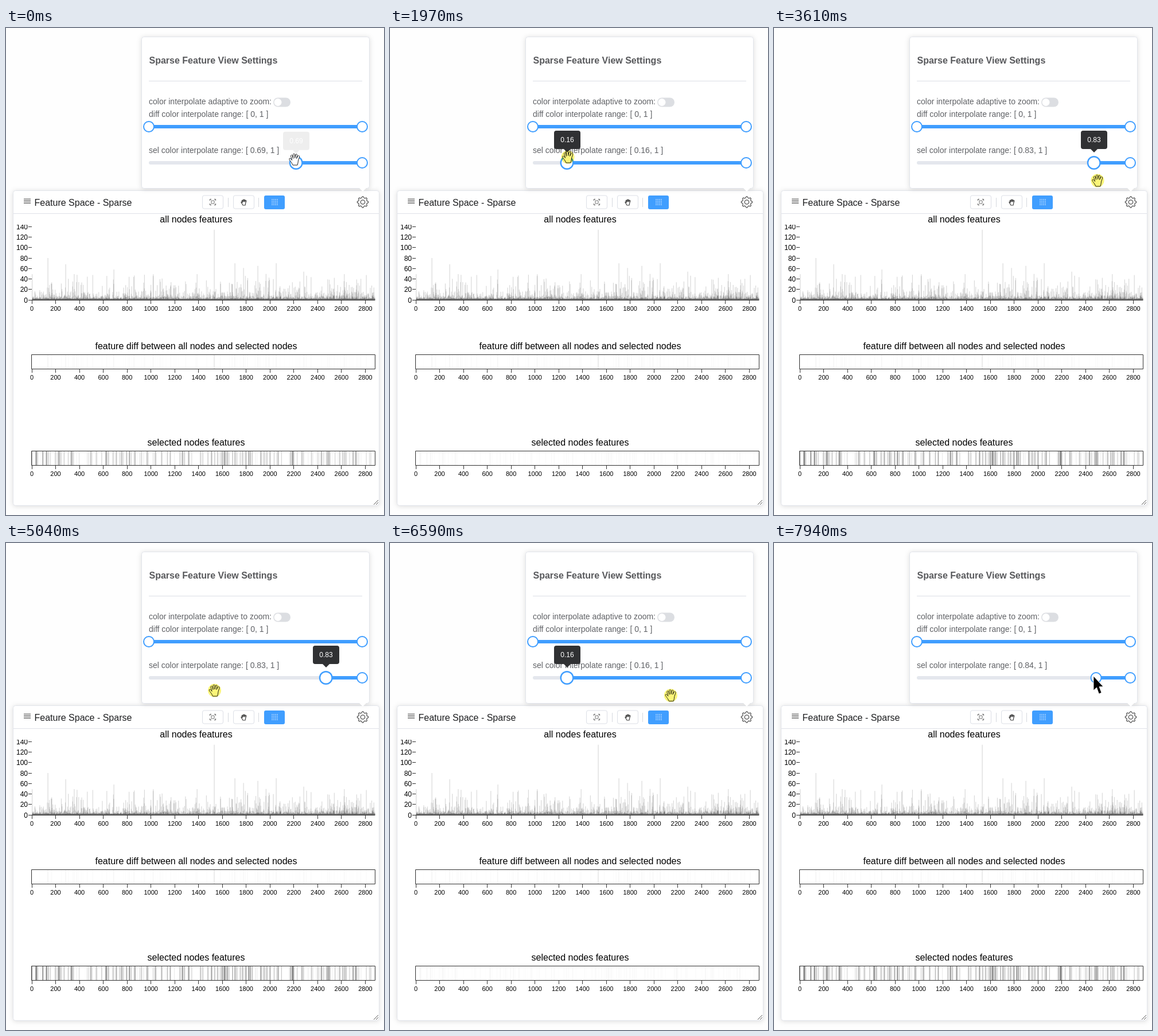
An HTML page with a canvas for the animation above (8010 ms loop, 659 px wide and 849 px high).

```html
<!DOCTYPE html>
<html lang="en">
<head>
<meta charset="utf-8">
<title>Sparse Feature View</title>
<style>
  html, body { margin: 0; width: 100%; height: 100%; overflow: hidden; background: #fefefe; }
  canvas, svg { position: absolute; left: 0; top: 0; width: 659px; height: 849px; }
  svg { font-family: "Liberation Sans", Arial, sans-serif; }
  .card { fill: #fff; stroke: #e2e5eb; filter: drop-shadow(0 1px 4px #0002); }
  .label { font-size: 14px; fill: #606266; }
  .title { font-size: 16px; fill: #000; text-anchor: middle; }
  .tick { font-size: 11px; fill: #000; text-anchor: middle; }
  .yTick { font-size: 12px; fill: #000; text-anchor: end; }
  .button { fill: #fff; stroke: #dcdfe6; }
  .line { fill: none; stroke: #555; }
  .knob { fill: #fff; stroke: #409eff; stroke-width: 2; }
</style>
</head>
<body>
<svg viewBox="0 0 659 849">
  <rect class="card" x="12.5" y="283.5" width="638" height="549" rx="4"/>
  <path d="M13 323.5H650" stroke="#dfe2e8"/>
  <path class="line" d="M31 298H43M31 300.5H43M31 303H43M31 305.5H43" stroke-width="1.2"/>
  <text x="49.5" y="309.5" font-size="16" fill="#1c1d1f">Feature Space - Sparse</text>
  <rect class="button" x="342.5" y="292" width="36" height="23" rx="3"/>
  <rect class="button" x="396.5" y="292" width="36" height="23" rx="3"/>
  <rect x="450" y="292" width="36" height="24" rx="3" fill="#409eff"/>
  <path d="M387.5 296V312M440.5 296V312" stroke="#d5d8de"/>
  <path class="line" d="M355.5 301v-2.5h2.5M363 298.5h2.5v2.5M365.5 306v2.5h-2.5M358 308.5h-2.5v-2.5"/>
  <rect class="line" x="358" y="301" width="5" height="5" stroke-width=".8"/>
  <path d="M463 299H474M463 302H474M463 305H474M463 308H474" stroke="#fff" stroke-width="1.2" stroke-dasharray="2 1" opacity=".8"/>
  <path id="handIcon" fill="#fff" stroke="#444" stroke-width="2.4" transform="translate(414.5 304) scale(.5)"/>
  <path id="gear" class="line" stroke-width="1.3" stroke-linejoin="round" transform="translate(622 303.5)"/>
  <circle class="line" cx="622" cy="303.5" r="3.7" stroke-width="1.3"/>
  <path class="line" d="M641 831L649 823M645 831L649 827"/>
  <g id="axes"></g>

  <rect class="card" x="236.5" y="15.5" width="397" height="264" rx="4"/>
  <path d="M616 279L622 285L628 279Z" fill="#fff"/>
  <text x="249.5" y="62" font-size="16" font-weight="bold" fill="#58595c">Sparse Feature View Settings</text>
  <path d="M249 92.5H621" stroke="#dcdfe6"/>
  <text class="label" x="249" y="133">color interpolate adaptive to zoom:</text>
  <rect x="466" y="121.5" width="30" height="16" rx="8" fill="#dcdee2"/>
  <circle cx="474" cy="129.5" r="6.5" fill="#fff"/>
  <text class="label" x="249" y="155">diff color interpolate range: [ 0, 1 ]</text>
  <rect x="249" y="169" width="372" height="6" fill="#409eff"/>
  <circle class="knob" cx="249" cy="172" r="9"/>
  <circle class="knob" cx="621" cy="172" r="9"/>
  <text class="label" id="rangeText" x="249" y="218"></text>
  <rect x="249" y="232" width="372" height="6" rx="3" fill="#e4e7ed"/>
  <rect id="bar" y="232" height="6" fill="#409eff"/>
  <circle class="knob" cx="621" cy="235" r="9"/>
  <circle class="knob" id="handle" r="9"/>
  <g id="tooltip">
    <path d="M-6 211H6L0 217Z" fill="#303133"/>
    <rect x="-23" y="179" width="46" height="32" rx="4" fill="#303133"/>
    <text id="tipText" y="199" font-size="12" fill="#fff" text-anchor="middle"></text>
  </g>
  <path id="hand" fill="#fff" stroke="#222" stroke-linejoin="round"/>
  <circle id="press" r="11.5" fill="#fbf578" style="mix-blend-mode:multiply"/>
  <path id="arrow" d="M0 0V25L5.5 20L9.5 31L14 29L10 18.5H17Z" stroke="#fff" stroke-width=".8"/>
</svg>
<canvas id="data" width="659" height="849"></canvas>
<script>
const $ = id => document.getElementById(id);
const set = (id, attrs) => { for (const k in attrs) $(id).setAttribute(k, attrs[k]); };
const LOOP = 8010, COUNT = 2880, LEFT = 45, WIDTH = 598, BASE = 474, UNIT = 0.9125;
const SLIDER = 249, SLIDER_WIDTH = 372;

// The tallest features; all others follow a seeded long-tailed distribution.
const peaks = [[73, 80], [104, 68], [188, 58], [363, 134], [399, 70], [414, 61], [439, 65], [471, 70], [519, 54]];

// Each cursor move eases out to its goal; the slider catches up in jumps.
const moves = [
  { start: 70, end: 260, x: 511, y: 247 },
  { start: 670, end: 1140, x: 354, y: 230 },
  { start: 1360, end: 1970, x: 310, y: 225 },
  { start: 2370, end: 3130, x: 498, y: 257 },
  { start: 3200, end: 3610, x: 564, y: 266 },
  { start: 4690, end: 5310, x: 317, y: 255 },
  { start: 6250, end: 6990, x: 560, y: 270 },
  { start: 7530, end: 7930, x: 557, y: 232 },
];
const sliderSteps = [[0, .69], [1100, .58], [1640, .16], [2850, .55], [3400, .83], [5650, .16], [6850, .84]];

const ramp = (t, start, end) => Math.min(1, Math.max(0, (t - start) / (end - start)));
const easeOut = p => 1 - (1 - p) ** 2;

function cursorAt(t) {
  let x = 503, y = 229;
  for (const move of moves) {
    const p = easeOut(ramp(t, move.start, move.end));
    x += (move.x - x) * p;
    y += (move.y - y) * p;
  }
  return [x, y];
}

function randomizer(seed) {
  return () => (seed = (seed * 16807) % 2147483647) / 2147483647;
}

const ctx = $("data").getContext("2d");
function stripe(x, y, height, alpha, width = 1) {
  ctx.fillStyle = `rgba(0,0,0,${alpha})`;
  ctx.fillRect(x, y, width, height);
}

function drawFeatures() {
  const random = randomizer(71);
  const drawFeature = (x, value) => {
    stripe(x, BASE - value * UNIT, value * UNIT, .15, 1.2);
    stripe(x, 570, 24, .1 * (value / 100) ** 1.6);
  };
  for (let i = 0; i < COUNT; i++) drawFeature(LEFT + i * WIDTH / COUNT, 1.5 / (random() + .03));
  for (const [x, value] of peaks) drawFeature(x - .5, value);
}

function drawSelected(value) {
  const random = randomizer(53);
  ctx.clearRect(LEFT, 738, WIDTH, 24);
  ctx.globalAlpha = (value / .84) ** 1.6;
  for (let i = 0; i < 300; i++) {
    stripe(LEFT + random() * (WIDTH - 3), 738, 24, .36 * random() ** 2, 1 + 1.5 * random());
  }
  ctx.globalAlpha = 1;
}

function buildAxes() {
  let svg = "";
  const text = (cls, x, y, s) => svg += `<text class="${cls}" x="${x}" y="${y}">${s}</text>`;
  const path = d => svg += `<path d="${d}" fill="none" stroke="#333"/>`;
  text("title", 331.5, 338.5, "all nodes features");
  text("title", 331.5, 560, "feature diff between all nodes and selected nodes");
  text("title", 331.5, 728, "selected nodes features");
  for (const y of [474, 594, 762]) {
    for (let n = 0; n < COUNT; n += 200) {
      const x = LEFT + n * WIDTH / COUNT;
      path(`M${Math.floor(x) + .5} ${y}v7`);
      text("tick", x, y + 19, n);
    }
  }
  path("M44.5 474.5h599");
  path("M44.5 569.5h599v25h-599z");
  path("M44.5 737.5h599v25h-599z");
  svg += '<clipPath id="axisClip"><rect x="13" y="343" width="40" height="140"/></clipPath><g clip-path="url(#axisClip)">';
  for (let n = 0; n <= 140; n += 20) {
    const y = BASE - n * UNIT;
    path(`M39 ${Math.floor(y) + .5}h6`);
    text("yTick", 38, y + 4.5, n);
  }
  $("axes").innerHTML = svg + "</g>";
}

function gearPath() {
  const points = [];
  for (let i = 0; i < 32; i++) {
    const angle = (i - 1.5) * Math.PI / 16, r = i % 4 === 1 || i % 4 === 2 ? 9.6 : 7.6;
    points.push((r * Math.cos(angle)).toFixed(2) + " " + (r * Math.sin(angle)).toFixed(2));
  }
  return "M" + points.join("L") + "Z";
}

const handShape = "M-3 10L-5 6C-7 3-10 0-9-1.5C-7-2.5-5.5 0-4.5 1.5L-6.5-6C-6.5-8-4-8-3.5-6L-2.5-1.5V-8" +
  "C-2.5-10.500 .5-10.500 .5-8V-2L1.800-8C2.300-10 4.800-9.500 4.500-7L3.500-1.500L6-6C7-7.500 9.500-6 8.500-4L6.500 2L6 6L5 10Z";

let shownValue;
function showValue(value) {
  if (value === shownValue) return;
  shownValue = value;
  const x = SLIDER + value * SLIDER_WIDTH;
  $("rangeText").textContent = `sel color interpolate range: [ ${value}, 1 ]`;
  $("tipText").textContent = value;
  set("bar", { x, width: SLIDER + SLIDER_WIDTH - x });
  drawSelected(value);
}

function render(t) {
  const value = sliderSteps.findLast(([time]) => time <= t)[1];
  const x = SLIDER + value * SLIDER_WIDTH;
  const opacity = Math.max(.08, ramp(t, 70, 260)) * (1 - ramp(t, 7530, 7800));
  const transform = `translate(${cursorAt(t).join(" ")})`;
  const show = visible => ({ transform, visibility: visible ? "visible" : "hidden" });
  showValue(value);
  set("handle", { transform: `translate(${x} 235) scale(${t < 7900 ? 1.2 : 1})` });
  set("tooltip", { transform: `translate(${Math.round(x)} ${2 * (1 - opacity)})`, opacity });
  set("hand", show(t < 7600));
  set("arrow", show(t >= 7600));
  set("press", show(t >= 460 && t < 7530));
}

buildAxes();
drawFeatures();
set("gear", { d: gearPath() });
set("hand", { d: handShape });
set("handIcon", { d: handShape });

const start = performance.now();
function frame() {
  render((performance.now() - start) % LOOP);
  requestAnimationFrame(frame);
}
frame();
</script>
</body>
</html>
```
